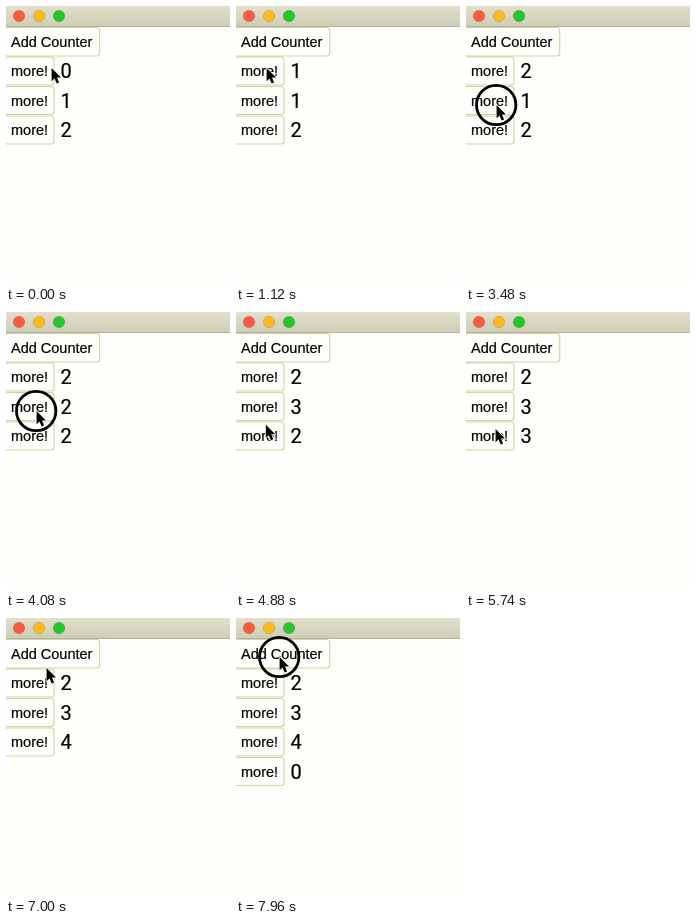
An HTML page that plays this animation: 224x278 px, repeating every 8000 ms.

```html
<!DOCTYPE html>
<html lang="en">
<head>
<meta charset="utf-8">
<title>Counters</title>
<style>
html, body { margin: 0; width: 100%; height: 100%; overflow: hidden; background: #fefefa; }
svg { display: block; width: 224px; height: 278px; }
text { font-family: "Liberation Sans", Arial, sans-serif; font-size: 14.5px; stroke: #000; stroke-width: 0.2; }
.count { font-family: Roboto, sans-serif; font-size: 20px; }
.button { fill: #fefefb; stroke: #d4d2a6; stroke-width: 1.1; }
.light { stroke: #000; stroke-opacity: 0.15; stroke-width: 0.8; }
</style>
</head>
<body>
<svg viewBox="0 0 224 278">
  <defs>
    <linearGradient id="bar" x2="0" y2="1">
      <stop offset="0" stop-color="#e2e0cc"/>
      <stop offset="1" stop-color="#cecdb6"/>
    </linearGradient>
  </defs>
  <rect width="224" height="278" fill="#fefefa"/>
  <rect width="224" height="20" fill="url(#bar)"/>
  <rect y="20" width="224" height="1" fill="#b5b3a2"/>
  <circle class="light" cx="13" cy="10" r="5.8" fill="#fb5a42"/>
  <circle class="light" cx="33" cy="10" r="5.8" fill="#fdb81c"/>
  <circle class="light" cx="53" cy="10" r="5.8" fill="#24c62c"/>
  <rect class="button" x="-1.5" y="21.5" width="95.2" height="28.5" rx="3"/>
  <text x="5" y="41">Add Counter</text>
  <g id="rows"></g>
  <circle id="ring" r="19.7" fill="none" stroke="#000" stroke-width="2.8"/>
  <path id="arrow" d="M0 0V13.2L2.9 10.5L5.1 15.5L7.5 14.5L5.4 9.5H9.4Z" stroke="#fff" stroke-width="1.6" stroke-linejoin="round" paint-order="stroke"/>
</svg>
<script>
const LOOP = 8000, HOLD = 280, FADE = 60, COUNT_DELAY = 140;
const FIRST_ROW = 51, PITCH = 29.5, ADD = 3;
const $ = id => document.getElementById(id);

const home = { x: 45, y: 61 };
// pointer glides: when, how long, where to
const glides = [
  { at: 0, span: 220, x: 28, y: 81 },
  { at: 220, span: 180, x: 30, y: 61 },
  { at: 1240, span: 140, x: 30, y: 64 },
  { at: 2220, span: 180, x: 30, y: 95 },
  { at: 2400, span: 400, x: 30, y: 98 },
  { at: 4580, span: 440, x: 29, y: 116 },
  { at: 6580, span: 420, x: 40, y: 49 },
  { at: 7100, span: 340, x: 43, y: 38 }
];
const clicks = [
  { at: 840, row: 0 }, { at: 1700, row: 0 },
  { at: 3480, row: 1 }, { at: 4080, row: 1 },
  { at: 5320, row: 2 }, { at: 6280, row: 2 },
  { at: 7680, row: ADD }
];

const clamp = v => Math.max(0, Math.min(1, v));
const ease = k => k * k * (3 - 2 * k);

$("rows").innerHTML = Array.from({ length: ADD + 1 }, (_, i) => {
  const y = FIRST_ROW + i * PITCH;
  return `<g>
    <rect class="button" x="-1.5" y="${y}" width="49.5" height="28" rx="3"/>
    <text x="5" y="${y + 19}">more!</text>
    <text class="count" x="54.5" y="${y + 21.3}"></text></g>`;
}).join("");
const rows = [...$("rows").children];
const labels = rows.map(row => row.querySelector(".count"));

function pointer(t) {
  let { x, y } = home;
  for (const g of glides) {
    const k = ease(clamp((t - g.at) / g.span));
    x += (g.x - x) * k;
    y += (g.y - y) * k;
  }
  return [x, y];
}

function draw(t) {
  const done = row => clicks.filter(c => c.row === row && t >= c.at + COUNT_DELAY).length;
  labels.forEach((label, i) => { label.textContent = i < ADD ? i + done(i) : 0; });
  rows[ADD].style.display = done(ADD) ? "" : "none";

  const click = clicks.findLast(c => t >= c.at);
  // the last press is still held when the loop ends
  const left = !click ? 0 : click.row === ADD ? FADE : click.at + HOLD - t;
  const [x, y] = pointer(t);
  $("arrow").setAttribute("transform", `translate(${x + 0.6} ${y + 1})`);
  $("ring").setAttribute("transform", `translate(${x + 0.2} ${y + 1})`);
  $("ring").setAttribute("opacity", clamp(left / FADE));
}

const start = performance.now();
function tick() {
  draw((performance.now() - start) % LOOP);
  requestAnimationFrame(tick);
}
tick();
</script>
</body>
</html>
```
